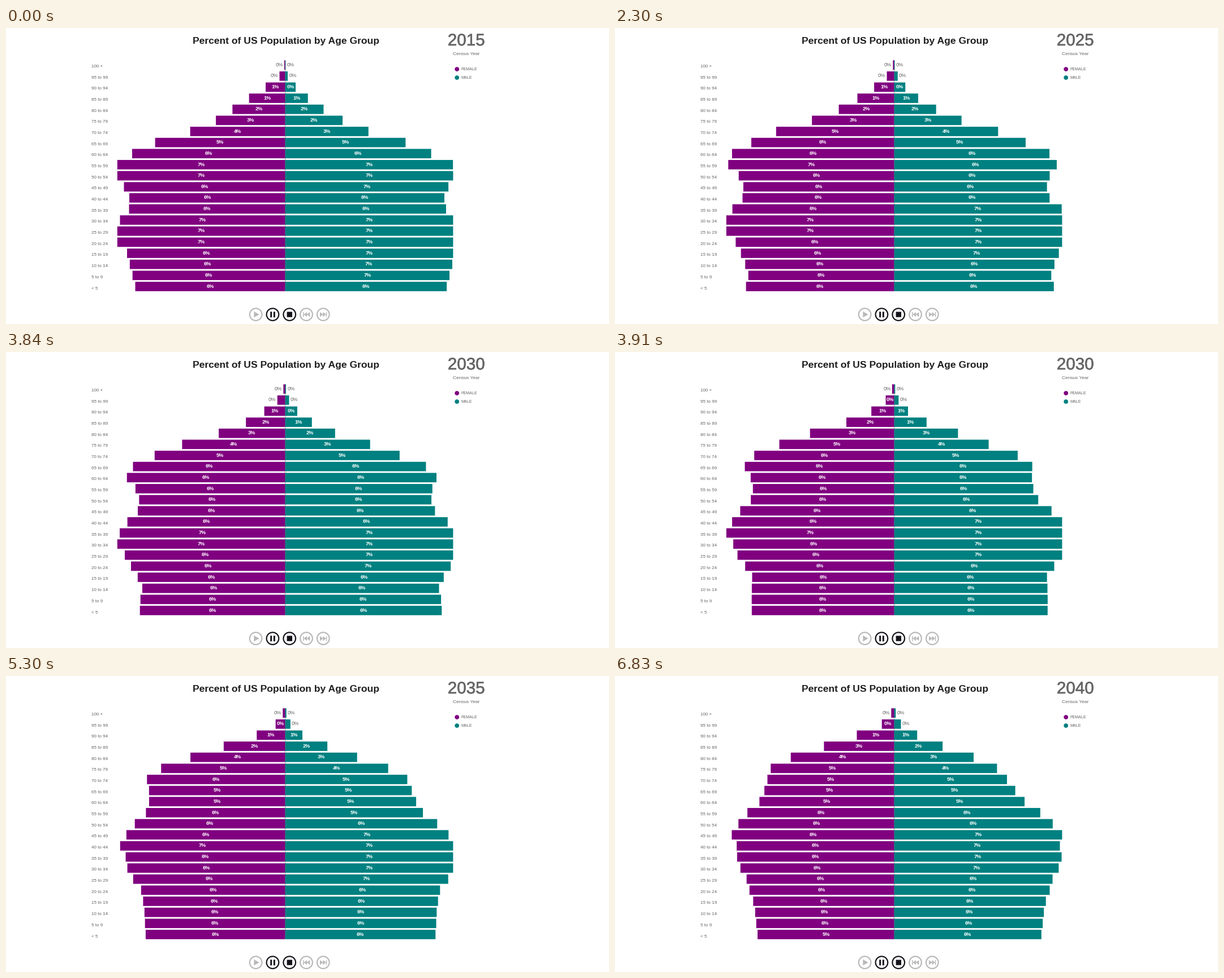
Recreate the animation shown at these times as a matplotlib script. Size 1066 px wide and 525 px high, loop 8000 ms.

```python
import matplotlib.patheffects as pe
import matplotlib.pyplot as plt
import numpy as np
from matplotlib.animation import FuncAnimation
from matplotlib.patches import Circle, Polygon, Rectangle

W, H, DPI = 1066, 525, 100
LOOP, STEP = 8000, 40
PX = 72 / DPI  # points per pixel

PURPLE, TEAL = "#800080", "#008080"
GREY, DARK, PALE = "#666666", "#15131a", "#b9b9b9"

# Bar rows run from the oldest group (0) to the youngest (20)
ROWS, TOP, PITCH, BAR_H = 21, 57.3, 19.64, 16.7
AXIS = 493.6
MAX_LEN = 296.8            # the scale clips longer bars
PER_CENT = 44.27           # pixels per percent
MIN_INSIDE = 14.5          # narrower bars carry their label outside

# The year ticks over first, the bars follow 70 ms later
YEAR_TIMES = [790, 2300, 3840, 5230, 6760]
BAR_LAG = 70

# Key points of the starting pyramid: female length by row
START = {0: 1.7, 1: 10.1, 2: 34.6, 5: 122.6, 6: 168, 7: 230, 8: 270.6,
         9: 302, 10: 306, 11: 285.1, 12: 275.6, 13: 276.1, 14: 292.1,
         15: 299, 16: 298.5, 17: 279.6, 20: 265.1}
# Men per woman by row
SEX_RATIO = {1: 0.436, 3: 0.627, 5: 0.827, 7: 0.925, 9: 0.982, 11: 1.012,
             18: 1.075, 20: 1.077}

rows = np.arange(ROWS)


def curve(points):
    return np.interp(rows, list(points), list(points.values()))


def survival(k, death, decay):
    """Change of a cohort's share as it enters each row at step k."""
    mortality = death * decay ** -rows * 0.965 ** k
    migration = 0.037 * np.exp(-((rows - 15.2) / 1.3) ** 2 / 2)
    growth = 0.028 - 0.004 * k
    return np.exp(migration - mortality - growth)


def project(start, births, death, decay):
    """Age the pyramid by one row per step."""
    states = [start]
    for k in range(len(YEAR_TIMES)):
        old, keep = states[-1], survival(k, death, decay)
        new = np.append(old[1:], 0) * keep
        new[0] += old[0] * keep[0]
        new[-1] = births * (262 - 5.1 * k)
        states.append(new)
    return states


ratio = curve(SEX_RATIO)
FEMALE = project(curve(START), 1, 1.6, 1.69)
MALE = project(curve(START) * ratio, ratio[-1], 1.65, 1.55)

plt.rcParams["font.family"] = "Liberation Sans"
fig = plt.figure(figsize=(W / DPI, H / DPI), dpi=DPI, facecolor="white")
ax = fig.add_axes([0, 0, 1, 1])
ax.set_xlim(0, W)
ax.set_ylim(H, 0)
ax.axis("off")


def label(x, y, text, size, color=GREY, ha="left", **kw):
    return ax.text(x, y, text, fontsize=size * PX, color=color, ha=ha,
                   va="baseline", **kw)


def box(x, y, w, h, color):
    return ax.add_patch(Rectangle((x, y), w, h, fc=color, lw=0, snap=False))


def triangle(x, tip, half, color, cy=508.1):
    ax.add_patch(Polygon([(x, cy - half), (tip, cy), (x, cy + half)],
                         fc=color, lw=0))


def ring(x, color):
    ax.add_patch(Circle((x, 508.1), 10.8, fill=False, ec=color, lw=2.2 * PX))


def draw_controls():
    for i, color in enumerate([PALE, DARK, DARK, PALE, PALE]):
        ring(441.6 + 29.8 * i, color)
    triangle(438.3, 447.8, 5.3, PALE)
    for x in (467.2, 472.8):
        box(x, 503.2, 3, 10, DARK)
    box(496.6, 503.4, 9.4, 9.4, DARK)
    for x in (525, 565.8):
        box(x, 504, 1.5, 8.5, PALE)
    for k in range(2):
        triangle(532 + 5.3 * k, 526.5 + 5.3 * k, 4.3, PALE)
        triangle(555 + 5.3 * k, 560.5 + 5.3 * k, 4.3, PALE)


def age_name(row):
    low = 5 * (ROWS - 1 - row)
    if low == 100:
        return "100 +"
    return f"{low} to {low + 4}" if low else "< 5"


class Side:
    """One half of the pyramid; sign is -1 to the left, +1 to the right."""

    def __init__(self, sign, color):
        self.sign = sign
        self.bars, self.texts = [], []
        for row in rows:
            y = TOP + PITCH * row
            self.bars.append(box(AXIS, y, 1, BAR_H, color))
            self.texts.append(label(AXIS, y + BAR_H / 2 + 2.1, "", 9.2))

    def show(self, lengths):
        for bar, text, length in zip(self.bars, self.texts, lengths):
            length = min(length, MAX_LEN)
            bar.set_width(self.sign * length)
            text.set_text(f"{round(length / PER_CENT)}%")
            if length > MIN_INSIDE:
                text.set(x=AXIS + self.sign * length / 2, ha="center",
                         color="white", fontweight="bold")
            else:
                text.set(x=AXIS + self.sign * (length + 2.3), color=GREY,
                         fontweight="normal",
                         ha="left" if self.sign > 0 else "right")


label(495.5, 28, "Percent of US Population by Age Group", 17.5, "#1f1f1f",
      "center", fontweight="bold")
year = label(813.7, 31, "", 29.6, GREY, "center",
             path_effects=[pe.withStroke(linewidth=0.45, foreground=GREY)])
label(814, 48, "Census Year", 8.4, GREY, "center")
for cy, color, name in [(73, PURPLE, "FEMALE"), (88, TEAL, "MALE")]:
    ax.add_patch(Circle((797.2, cy), 3.9, fc=color, lw=0))
    label(804.6, cy + 2, name, 7.1)
for row in rows:
    label(150.7, 69.9 + 19.68 * row, age_name(row), 8)

box(AXIS - 0.5, TOP, 1, PITCH * (ROWS - 1) + BAR_H, "#a0a0a0")
left, right = Side(-1, PURPLE), Side(1, TEAL)
draw_controls()


def update(i):
    t = i * STEP + 30
    year.set_text(str(2015 + 5 * sum(t >= s for s in YEAR_TIMES)))
    k = sum(t >= s + BAR_LAG for s in YEAR_TIMES)
    left.show(FEMALE[k])
    right.show(MALE[k])
    return []


anim = FuncAnimation(fig, update, frames=LOOP // STEP, interval=STEP,
                     repeat=True, repeat_delay=0)
plt.show()
```
